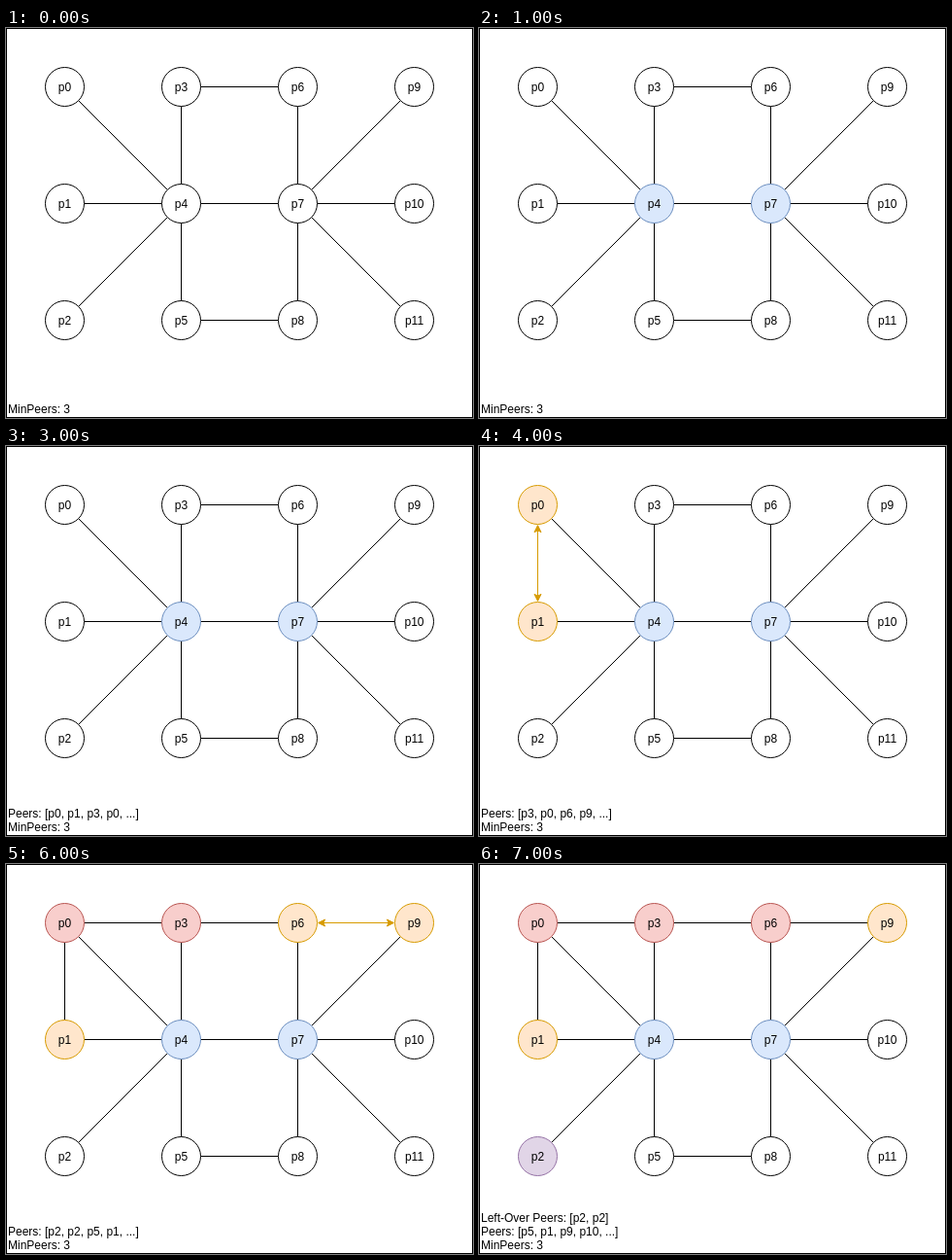
Recreate the animation shown at these times as an HTML page. Size 481 px wide and 401 px high, loop 8 s.

```html
<!DOCTYPE html>
<html lang="en">
<head>
<meta charset="utf-8">
<title>Peer graph</title>
<style>
  html, body { margin: 0; width: 100%; height: 100%; overflow: hidden; background: #fff; }
  svg { display: block; width: 481px; height: 401px; }
  text { font: 12px "Liberation Sans", Arial, Helvetica, sans-serif; fill: #000; }
</style>
</head>
<body>
<svg id="stage" viewBox="0 0 481 401" xmlns="http://www.w3.org/2000/svg"></svg>
<script>
const NS = 'http://www.w3.org/2000/svg';
const STEP = 1000, SPACING = 120, RADIUS = 20;
const stage = document.getElementById('stage');

const PLAIN = ['#ffffff', '#000000'];
const BLUE = ['#dae8fc', '#6c8ebf'];
const ORANGE = ['#ffe6cc', '#d79b00'];
const RED = ['#f8cecc', '#b85450'];
const PURPLE = ['#e1d5e7', '#9673a6'];

const hubs = { 4: BLUE, 7: BLUE };
const first = { ...hubs, 0: ORANGE, 1: ORANGE };
const second = { ...first, 3: ORANGE };
const third = { ...second, 0: RED, 3: RED, 6: ORANGE, 9: ORANGE };
const last = { ...third, 6: RED, 2: PURPLE };

// link: the pair being joined; joined: how many extra edges are finished
const steps = [
  { fills: {}, joined: 0 },
  { fills: hubs, joined: 0 },
  { fills: hubs, joined: 0, peers: 'p0, p0, p1, p1' },
  { fills: hubs, joined: 0, peers: 'p0, p1, p3, p0' },
  { fills: first, joined: 0, link: [0, 1], peers: 'p3, p0, p6, p9' },
  { fills: second, joined: 1, link: [0, 3], peers: 'p6, p9, p2, p2' },
  { fills: third, joined: 2, link: [6, 9], peers: 'p2, p2, p5, p1' },
  { fills: last, joined: 3, peers: 'p5, p1, p9, p10', left: 'p2, p2' }
];

function add(parent, tag, attrs, content) {
  const el = document.createElementNS(NS, tag);
  for (const key in attrs) el.setAttribute(key, attrs[key]);
  if (content) el.textContent = content;
  parent.appendChild(el);
  return el;
}

const place = i => [60 + SPACING * Math.floor(i / 3), 60 + SPACING * (i % 3)];

// Frame of reference along an edge, starting at the rim of node a
function span(a, b) {
  const [x1, y1] = place(a), [x2, y2] = place(b);
  const len = Math.hypot(x2 - x1, y2 - y1);
  const ux = (x2 - x1) / len, uy = (y2 - y1) / len;
  const at = (d, side = 0) =>
    `${x1 + ux * (RADIUS + d) - uy * side} ${y1 + uy * (RADIUS + d) + ux * side}`;
  return { at, len: len - 2 * RADIUS };
}

function edge(a, b) {
  const { at, len } = span(a, b);
  return add(art, 'path', { d: `M${at(0)}L${at(len)}`, stroke: '#000', fill: 'none' });
}

function head(a, b) {
  const { at } = span(a, b);
  return `M${at(1.12)}L${at(8.12, 3.5)}L${at(6.37)}L${at(8.12, -3.5)}Z`;
}

function arrow(a, b) {
  const { at, len } = span(a, b);
  return `M${at(6.37)}L${at(len - 6.37)}` + head(a, b) + head(b, a);
}

add(stage, 'rect', { x: 0.5, y: 0.5, width: 480, height: 400, fill: '#fff', stroke: '#000' });
const art = add(stage, 'g', { transform: 'translate(.5 .5)', 'stroke-miterlimit': 10 });

[[0, 4], [1, 4], [2, 4], [3, 4], [4, 5], [4, 7], [3, 6], [5, 8],
 [6, 7], [7, 8], [7, 9], [7, 10], [7, 11]].forEach(([a, b]) => edge(a, b));
const extras = [[0, 1], [0, 3], [6, 9]].map(([a, b]) => edge(a, b));
const link = add(art, 'path', { fill: ORANGE[1], stroke: ORANGE[1] });

const nodes = Array.from({ length: 12 }, (_, i) => {
  const [cx, cy] = place(i);
  const disc = add(art, 'circle', { cx, cy, r: RADIUS });
  add(stage, 'text', { x: cx + 0.5, y: cy + 5, 'text-anchor': 'middle' }, 'p' + i);
  return disc;
});

const leftLine = add(stage, 'text', { x: 2, y: 368 });
const peerLine = add(stage, 'text', { x: 2, y: 382 });
add(stage, 'text', { x: 2, y: 396 }, 'MinPeers: 3');

let shown = -1;
function render(ms) {
  const index = Math.floor(ms / STEP) % steps.length;
  if (index === shown) return;
  shown = index;
  const s = steps[index];
  nodes.forEach((disc, i) => {
    const [fill, stroke] = s.fills[i] || PLAIN;
    disc.setAttribute('fill', fill);
    disc.setAttribute('stroke', stroke);
  });
  extras.forEach((line, i) => line.setAttribute('visibility', i < s.joined ? 'visible' : 'hidden'));
  link.setAttribute('d', s.link ? arrow(...s.link) : '');
  peerLine.textContent = s.peers ? `Peers: [${s.peers}, ...]` : '';
  leftLine.textContent = s.left ? `Left-Over Peers: [${s.left}]` : '';
}

const start = performance.now();
function tick() {
  render(performance.now() - start);
  requestAnimationFrame(tick);
}
tick();
</script>
</body>
</html>
```
